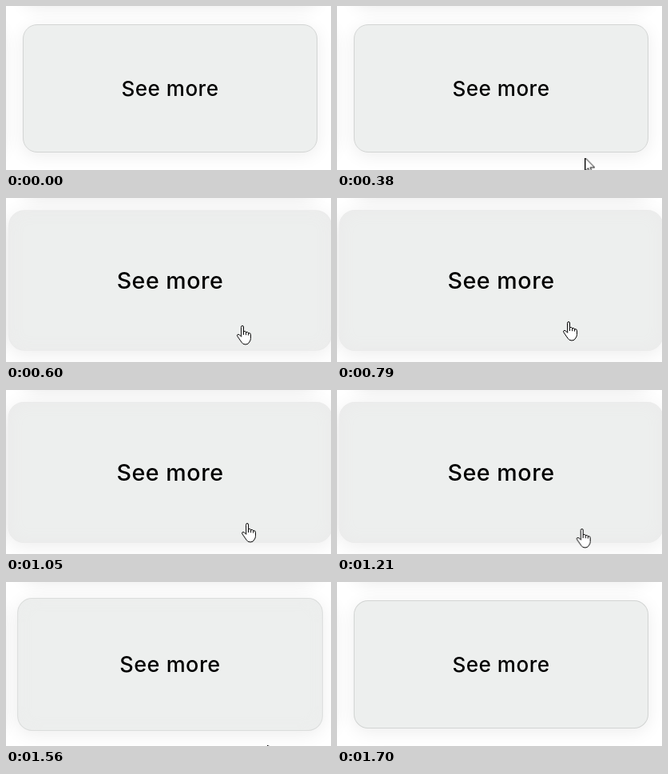
Animation, 407 px wide and 206 px high, one loop 2570 ms. Source, as an HTML page:

```html
<!DOCTYPE html>
<html lang="en">
<head>
<meta charset="utf-8">
<title>Card hover</title>
<style>
  html, body { margin: 0; width: 100%; height: 100%; overflow: hidden; background: #fff; }
  .stage { position: relative; width: 407px; height: 206px; overflow: hidden; background: #fff; }
  .card {
    position: absolute; left: 21px; top: 23px; width: 369px; height: 160.5px;
    box-sizing: border-box; border: 1px solid #d2d4d3; border-radius: 18px;
    background: #edefee; box-shadow: 0 4px 22px rgba(0, 0, 0, .075);
  }
  .above { top: -162px; }
  .left { left: -372px; }
  .main {
    display: flex; align-items: center; justify-content: center; padding-top: 2px;
    font: 500 26px/1 Inter, "Open Sans", sans-serif; letter-spacing: .5px;
    color: #000; white-space: nowrap;
  }
  .cursor { position: absolute; left: 0; top: 0; overflow: visible; }
  .cursor path { fill: #fff; stroke: #000; stroke-linejoin: round; stroke-linecap: round; }
</style>
</head>
<body>
<div class="stage">
  <div class="card above"></div>
  <div class="card left"></div>
  <div class="card main" id="card">See more</div>
  <svg class="cursor" id="cursor" width="20" height="26">
    <g id="hand" transform="translate(-7 0)">
      <path d="M5.5 2Q5.5.5 7 .5T8.5 2V7.6Q11.3 6.8 11.6 8.6Q14.2 7.9 14.6 9.6Q17.4 9.2 17.5 11.8V16.5Q17.4 19 15.8 21Q14.6 24 11 24Q7.4 24 6 21.2L.9 13.8Q-.1 11.6 1.9 11.3Q3.4 11.3 5.5 14Z"/>
      <path d="M8.5 7.6V11.6M11.6 8.6V11.8M14.6 9.6V12.2"/>
    </g>
    <path id="arrow" d="M.5.5V16.5L4.2 13L6.8 19L9.3 18L6.8 12.2H12Z"/>
  </svg>
</div>
<script>
  const LOOP = 2570, ENTER = 407, LEAVE = 1470, FADE = 250;

  // Loops through key styles (each with a time `ms`), holding the first and last.
  const play = (id, ...keys) => {
    const held = [{ ...keys[0], ms: 0 }, ...keys, { ...keys.at(-1), ms: LOOP }];
    document.getElementById(id).animate(
      held.map(({ ms, ...style }) => ({ offset: ms / LOOP, ...style })),
      { duration: LOOP, iterations: Infinity });
  };

  // Switches between two styles while hovered, each change taking `fade` ms.
  const onHover = (id, off, on, fade) => play(id,
    { ...off, ms: ENTER }, { ...on, ms: ENTER + fade },
    { ...on, ms: LEAVE }, { ...off, ms: LEAVE + fade });

  const look = (scale, border, inset) => ({
    transform: `scale(${scale})`,
    borderColor: border,
    boxShadow: `0 4px 22px rgba(0,0,0,.075), inset 0 0 16px 2px rgba(235,235,235,${inset})`,
    easing: 'ease'
  });
  onHover('card', look(1, '#d2d4d3', 0), look(1.1, '#ebebeb', 1), FADE);
  onHover('hand', { opacity: 0 }, { opacity: 1 }, 0);
  onHover('arrow', { opacity: 1 }, { opacity: 0 }, 0);

  // The pointer slows to a stop, rests, then speeds up on its way out.
  const tip = (ms, x, y, easing = 'linear') =>
    ({ ms, transform: `translate(${x}px, ${y}px)`, easing });
  play('cursor',
    tip(300, 316, 208),
    tip(500, 302, 165, 'ease-out'),
    tip(790, 290, 155),
    tip(990, 290, 155),
    tip(1050, 302, 167, 'cubic-bezier(.35, .12, .7, .55)'),
    tip(1600, 330, 209));
</script>
</body>
</html>
```
